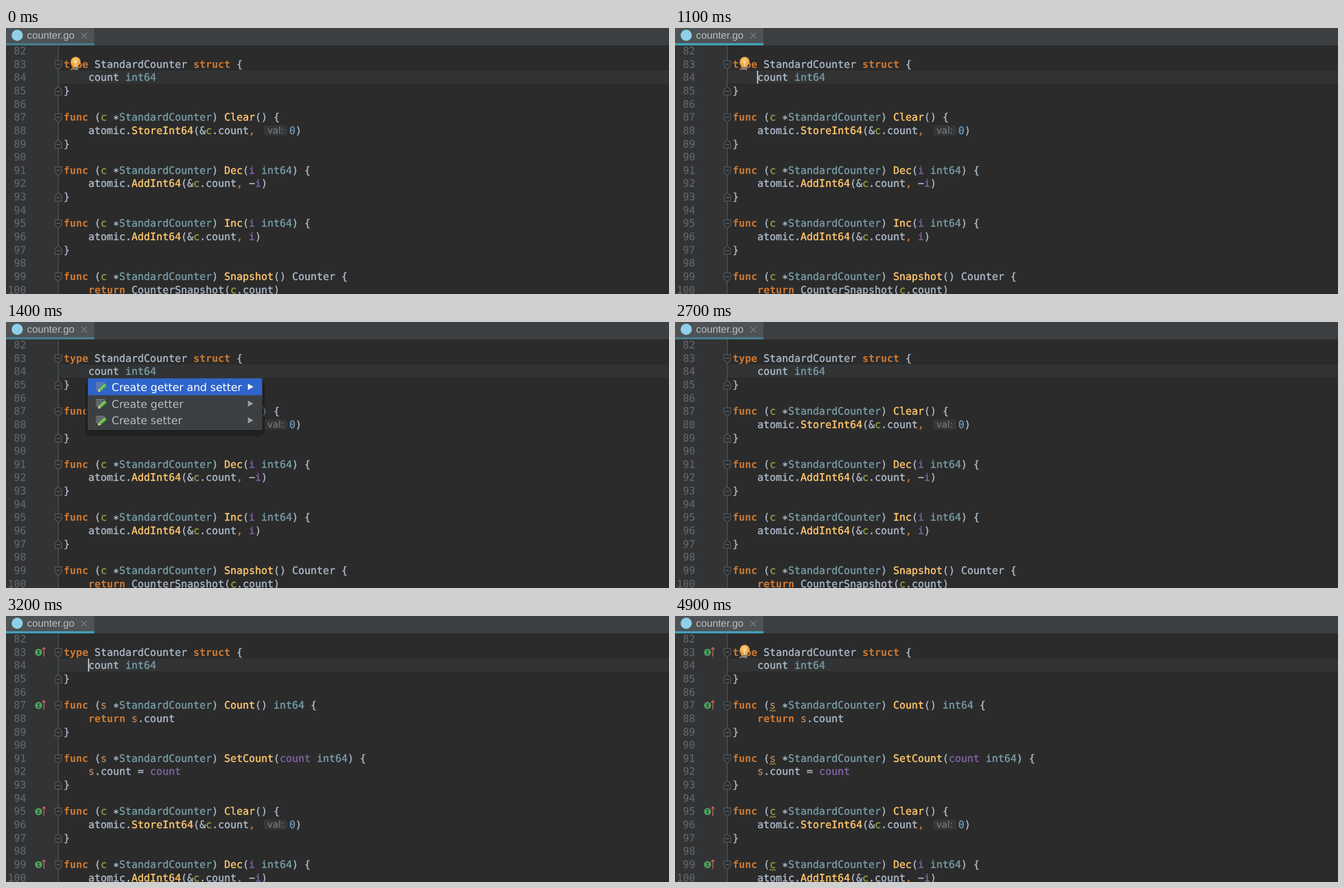
Recreate the animation shown at these times as an HTML page with a canvas. Size 1182 by 474 pixels, loop 5300 ms.

```html
<!DOCTYPE html>
<html lang="en">
<head>
<meta charset="utf-8">
<title>Editor: create getter and setter</title>
<style>
  html, body { margin: 0; width: 100%; height: 100%; overflow: hidden; background: #2b2b2b; }
  canvas { display: block; }
</style>
</head>
<body>
<canvas id="stage" width="1182" height="474"></canvas>
<script>
const ctx = document.getElementById('stage').getContext('2d');
const W = 1182, H = 474, LOOP = 5300;
const FIRST = 83, PITCH = 23.64, TEXT_X = 102.8, CHAR = 11.005;
const MONO = '18.28px "DejaVu Sans Mono", monospace';
const SANS = '"DejaVu Sans", sans-serif';

// ~x switches the style of the text that follows
const STYLES = {
  d: ['#a9b7c6'],
  k: ['#cc7832', 'bold '],
  p: ['#cc7832'],
  t: ['#769aa5'],
  f: ['#ffc66d'],
  r: ['#8f9e3f'],
  s: ['#b5835f'],
  a: ['#7e62a3'],
  n: ['#6897bb']
};

const method = (recv, rest) => `~kfunc~d (~${recv}${recv === 's' ? 's' : 'c'}~d *~tStandardCounter~d) ${rest}`;
const INDENT = '    ';

const HEAD = [
  '~ktype~d StandardCounter ~kstruct~d {',
  INDENT + 'count ~tint64',
  '}',
  ''
];
const ADDED = [
  method('s', '~fCount~d() ~tint64~d {'),
  INDENT + '~kreturn ~ss~d.count',
  '}',
  '',
  method('s', '~fSetCount~d(~acount ~tint64~d) {'),
  INDENT + '~ss~d.count = ~acount',
  '}',
  ''
];
const TAIL = [
  method('r', '~fClear~d() {'),
  INDENT + 'atomic.~fStoreInt64~d(&~rc~d.count~p, ~hval:~n0~d)',
  '}',
  '',
  method('r', '~fDec~d(~ai ~tint64~d) {'),
  INDENT + 'atomic.~fAddInt64~d(&~rc~d.count~p, ~d\u2212~ai~d)',
  '}',
  '',
  method('r', '~fInc~d(~ai ~tint64~d) {'),
  INDENT + 'atomic.~fAddInt64~d(&~rc~d.count~p, ~ai~d)',
  '}',
  '',
  method('r', '~fSnapshot~d() Counter {'),
  INDENT + '~kreturn~d CounterSnapshot(~rc~d.count)'
];
const BEFORE = [...HEAD, ...TAIL];
const AFTER = [...HEAD, ...ADDED, ...TAIL].slice(0, 18);

const plain = line => line.replace(/~[^k]/g, '~d');
const rowMid = n => 64.2 + (n - FIRST) * PITCH;
const within = (t, spans) => spans.some(([a, b]) => t >= a && t < b);

function rect(x, y, w, h, color) {
  ctx.fillStyle = color;
  ctx.fillRect(x, y, w, h);
}

function round(x, y, w, h, r, color) {
  ctx.fillStyle = color;
  ctx.beginPath();
  ctx.roundRect(x, y, w, h, r);
  ctx.fill();
}

function disc(x, y, r, color) {
  ctx.fillStyle = color;
  ctx.beginPath();
  ctx.arc(x, y, r, 0, Math.PI * 2);
  ctx.fill();
}

function path(points, stroke, width, fill) {
  ctx.beginPath();
  points.forEach(([x, y]) => ctx.lineTo(x, y));
  if (fill) {
    ctx.closePath();
    ctx.fillStyle = fill;
    ctx.fill();
  }
  if (stroke) {
    ctx.strokeStyle = stroke;
    ctx.lineWidth = width;
    ctx.stroke();
  }
}

// "heft" thickens the letters a little
function label(str, x, y, font, color, heft = 0) {
  ctx.font = font;
  ctx.fillStyle = color;
  ctx.fillText(str, x, y);
  if (!heft) return;
  ctx.strokeStyle = color;
  ctx.lineWidth = heft;
  ctx.strokeText(str, x, y);
}

function codeLine(line, n) {
  const base = rowMid(n) + 6.5;
  let x = TEXT_X;
  for (const part of ('~d' + line).split('~').slice(1)) {
    const str = part.slice(1);
    if (part[0] === 'h') {
      round(x + 5, base - 15, 41.5, 17.5, 4, '#353738');
      label(str, x + 11, base - 1.2, '16.3px ' + SANS, '#7d8083');
      x += 50;
      continue;
    }
    const [color, weight = ''] = STYLES[part[0]];
    for (const ch of str) {
      // the asterisk is heavier and sits at the middle of the line
      if (ch === '*') label(ch, x, base + 3.6, 'bold ' + MONO, color);
      else if (ch !== ' ') label(ch, x, base, weight + MONO, color, weight ? 0 : 0.45);
      x += CHAR;
    }
  }
}

function foldMark(n, isEnd) {
  const y = rowMid(n) + 1, dir = isEnd ? -1 : 1, x = 93.3;
  const outline = [
    [x - 6, y - 7 * dir], [x + 6, y - 7 * dir], [x + 6, y + 2.5 * dir],
    [x, y + 8.3 * dir], [x - 6, y + 2.5 * dir], [x - 6, y - 7 * dir]
  ];
  path(outline, '#5c5f61', 1.2, '#2d2e2f');
  rect(x - 3, y - 0.7 - dir * 0.6, 6, 1.4, '#6c6e70');
}

function implementsMark(n) {
  const y = rowMid(n) + 0.6;
  disc(58, y, 6.3, '#4f9f5d');
  rect(57.3, y - 3.2, 1.5, 6.4, '#24402a');
  rect(56, y - 3.4, 4, 1.2, '#24402a');
  rect(56, y + 2.2, 4, 1.2, '#24402a');
  path([[67.5, y + 7.5], [67.5, y - 8]], '#cf5f58', 1.7);
  path([[64.5, y - 5], [67.5, y - 8.6], [70.5, y - 5]], '#cf5f58', 1.7);
}

function squiggle(n) {
  const y = rowMid(n) + 10, points = [];
  for (let i = 0; i < 5; i++) points.push([168.5 + i * 2.8, y + (i % 2 ? -1.4 : 1.4)]);
  path(points, '#a39146', 1.3);
}

function bulb() {
  round(120, 67, 8.5, 7.5, 2, '#8b8d8f');
  rect(120, 70.3, 8.5, 1, '#55585a');
  disc(124.2, 59.8, 8.6, '#f0aa48');
  path([[117.5, 64], [131, 64], [128, 69.5], [120.4, 69.5]], null, 0, '#f0aa48');
  disc(123.4, 58.4, 5, '#f7c374');
  path([[121.8, 59], [124.2, 62], [126.6, 59]], '#fde3b4', 1.3);
  path([[124.2, 62], [124.2, 69]], '#fde3b4', 1.3);
}

function pencil(y) {
  for (let i = 0; i < 5; i++) rect(160.5, y - 8 + i * 2.8, 15.5 - i * 1.9, 1.4, '#8c9094');
  path([[175.5, y - 6], [180, y - 1.5], [169, y + 8], [165, y + 4]], null, 0, '#56ad43');
  path([[176.8, y - 4.6], [166.3, y + 5.2]], '#93d77e', 1.8);
  path([[165, y + 4], [169, y + 8], [163, y + 9.5]], null, 0, '#e6cfa0');
  path([[163.8, y + 7.4], [165.2, y + 8.9], [163, y + 9.5]], null, 0, '#30302c');
}

function popup() {
  round(141, 104, 321, 100, 13, 'rgba(29,29,29,.55)');
  round(143, 102, 317, 98, 9, 'rgba(29,29,29,.45)');
  rect(146, 100, 310.5, 92, '#4a4d4f');
  rect(147, 101, 308.5, 90, '#3c3f41');
  rect(146, 100.5, 310.5, 30, '#2f65ca');
  ['Create getter and setter', 'Create getter', 'Create setter'].forEach((name, i) => {
    const y = 115.8 + i * 29.8;
    pencil(y);
    label(name, 188.3, y + 6.9, '19.1px ' + SANS, i ? '#bbbbbb' : '#ffffff');
    path([[431.3, y - 5.7], [441, y - 0.2], [431.3, y + 5.3]], null, 0, i ? '#9a9c9e' : '#ffffff');
  });
}

function tabBar(active) {
  rect(0, 0, W, 31, '#3c3f41');
  rect(0, 0, 157.5, 31, '#4e5254');
  rect(0, 27, 157.5, 4, active ? '#40a0b8' : '#477b8b');
  disc(20, 13, 10, '#8ed0ea');
  label('counter.go', 37.6, 19, '18.1px "Liberation Sans", Arial, sans-serif', '#bcbec0');
  path([[134.5, 8.5], [144.5, 18.5]], '#7b7f81', 1.4);
  path([[144.5, 8.5], [134.5, 18.5]], '#7b7f81', 1.4);
}

function draw(t) {
  const active = within(t, [[300, 1300], [2900, LOOP]]);
  const caret = within(t, [[300, 700], [1100, 1300], [2900, 3300], [3700, 4100], [4500, 4900]]);
  const edited = t >= 2900, colored = t >= 3100, folded = t >= 3200, checked = t >= 3300;
  const lines = edited ? AFTER : BEFORE;
  const isAdded = i => edited && i >= HEAD.length && i < HEAD.length + ADDED.length;

  rect(0, 0, W, H, '#2b2b2b');
  rect(0, 31, 93, H, '#313335');
  rect(0, 76, W, 23, '#323334');
  rect(92.7, 31, 1.2, H, '#56595b');

  for (let n = FIRST - 1; n <= 100; n++) {
    const str = String(n);
    label(str, 36 - str.length * CHAR, rowMid(n) + 6.5, MONO, '#606366', 0.3);
  }

  lines.forEach((line, i) => {
    const n = FIRST + i, opens = /^~k(func|type)/.test(line);
    codeLine(isAdded(i) && !colored ? plain(line) : line, n);
    if ((opens || line === '}') && (!isAdded(i) || folded)) foldMark(n, !opens);
    if (!edited || !opens) return;
    if (folded && n !== 91) implementsMark(n);
    if (checked && n !== FIRST) squiggle(n);
  });

  if (t < 1300 || checked) bulb();
  if (caret) rect(146.2, 76, 2, 23, '#cfcfcf');
  if (within(t, [[1400, 2700]])) popup();
  tabBar(active);
}

ctx.textRendering = 'geometricPrecision';
ctx.lineJoin = 'round';
const start = performance.now();
function tick() {
  draw((performance.now() - start) % LOOP);
  requestAnimationFrame(tick);
}
tick();
</script>
</body>
</html>
```
